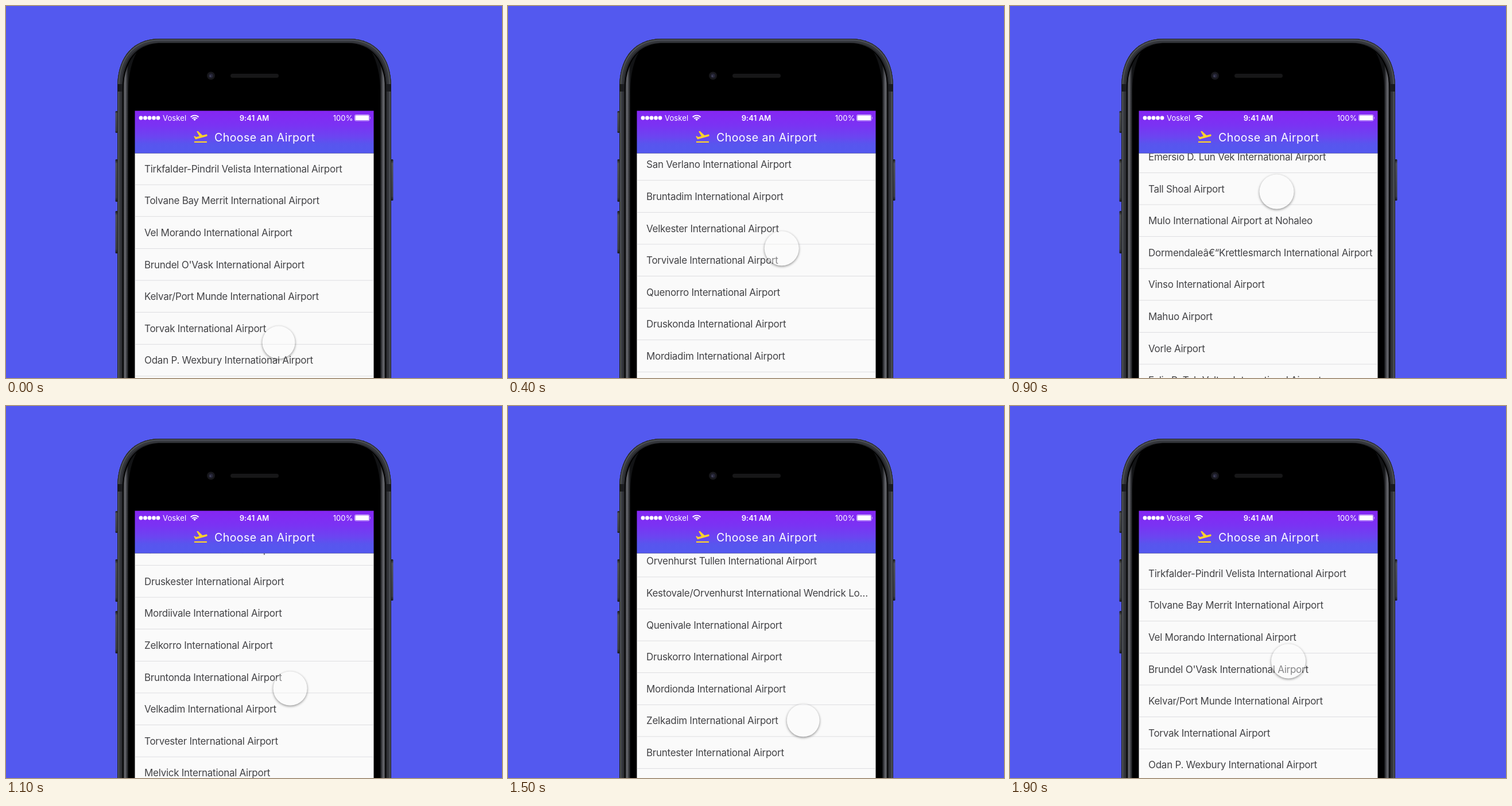
Recreate the animation shown at these times as an HTML page. Size 864 by 648 pixels, loop 2000 ms.

```html
<!DOCTYPE html>
<html lang="en">
<head>
<meta charset="utf-8">
<title>Airport list</title>
<style>
  html, body { margin: 0; width: 100%; height: 100%; overflow: hidden; background: #5359ef; }
  #stage { position: relative; width: 864px; height: 648px; overflow: hidden; }
  svg { display: block; font-family: Inter, Roboto, sans-serif; }
  #list text { font-size: 17px; letter-spacing: -.27px; fill: #434346; }
  .status { font-size: 13px; letter-spacing: .1px; fill: #fff; }
  #touch {
    position: absolute; left: 0; top: 0; border-radius: 50%;
    background: rgba(252, 252, 252, .36);
    box-shadow: 0 1.5px 4px rgba(0, 0, 0, .45);
  }
</style>
</head>
<body>
<div id="stage">
<svg width="864" height="648" viewBox="0 0 864 648">
  <defs>
    <linearGradient id="rim" gradientUnits="userSpaceOnUse" x1="204" x2="213" y1="0" y2="0">
      <stop offset="0" stop-color="#1b1c1f"/><stop offset=".35" stop-color="#6c6d73"/>
      <stop offset=".6" stop-color="#4a4b50"/><stop offset="1" stop-color="#121315"/>
    </linearGradient>
    <linearGradient id="key" x2="0" y2="1">
      <stop offset="0" stop-color="#17181b"/><stop offset=".1" stop-color="#4c4e53"/>
      <stop offset=".9" stop-color="#3a3c41"/><stop offset="1" stop-color="#17181b"/>
    </linearGradient>
    <linearGradient id="bar" x2="0" y2="1">
      <stop offset="0" stop-color="#8526f3"/><stop offset=".35" stop-color="#7a33f3"/>
      <stop offset=".62" stop-color="#6b45f1"/><stop offset=".78" stop-color="#5855ee"/>
      <stop offset="1" stop-color="#5359ef"/>
    </linearGradient>
    <path id="outline" d="M194 700V142C194 88 222 57 268 57H597C643 57 671 88 671 142V700Z"/>
    <path id="crescent" d="M204.500 648V145Q205 103 228 80Q214 106 213 145V648Z" fill="url(#rim)"/>
    <clipPath id="body"><use href="#outline"/></clipPath>
    <clipPath id="window"><rect x="224.500" y="256.500" width="416" height="392"/></clipPath>
  </defs>

  <rect width="864" height="648" fill="#5359ef"/>
  <g fill="url(#key)">
    <rect x="190.500" y="183" width="4" height="38" rx="1.500"/>
    <rect x="190.500" y="267" width="4" height="74" rx="1.500"/>
    <rect x="190.500" y="357" width="4" height="74" rx="1.500"/>
    <rect x="670.500" y="267" width="4" height="72" rx="1.500"/>
  </g>
  <g clip-path="url(#body)" fill="none">
    <use href="#outline" fill="#000"/>
    <use href="#outline" stroke="#25262a" stroke-width="19"/>
    <use href="#outline" stroke="#34363b" stroke-width="14"/>
    <use href="#outline" stroke="#4b4e54" stroke-width="7"/>
    <use href="#outline" stroke="#1f2023" stroke-width="2"/>
    <path d="M194 136h10v13h-10zM661 136h10v13h-10z" fill="#1b1c20"/>
  </g>
  <path d="M203 648V145C203 92 230 64.500 270 64.500H595C635 64.500 662 92 662 145V648Z"/>
  <use href="#crescent"/>
  <use href="#crescent" transform="translate(865) scale(-1 1)"/>
  <circle cx="357" cy="121.500" r="7" fill="#17171b"/>
  <circle cx="357" cy="121.500" r="3.800" fill="#262638"/>
  <circle cx="356" cy="122" r="1.500" fill="#46465e"/>
  <rect x="391" y="118" width="84" height="7" rx="3.500" fill="#171718"/>

  <rect x="224.500" y="256.500" width="416" height="392" fill="#fafafa"/>
  <g clip-path="url(#window)"><g id="list"></g></g>

  <rect x="224.500" y="182.500" width="416" height="74" fill="url(#bar)"/>
  <path d="M235 195h30.100" stroke="#fff" stroke-width="6.800" stroke-linecap="round" stroke-dasharray="0 7.500"/>
  <text class="status" x="273" y="199.700">Voskel</text>
  <g fill="none" stroke="#fff" stroke-width="1.900">
    <path d="M321.700 193.500a9.800 9.800 0 0 1 13.800 0M324.200 196.200a6.200 6.200 0 0 1 8.800 0"/>
    <path d="M328.600 200l-2.400-2.500a3.300 3.300 0 0 1 4.800 0z" fill="#fff" stroke="none"/>
  </g>
  <text class="status" x="432.500" y="199.700" text-anchor="middle" font-weight="600">9:41 AM</text>
  <text class="status" x="604.500" y="199.700" text-anchor="end">100%</text>
  <rect x="607.500" y="189.500" width="25.500" height="10.600" rx="2" fill="none" stroke="#fff" stroke-width=".6"/>
  <rect x="608.500" y="190.500" width="23.500" height="8.600" rx="1.200" fill="#fff"/>
  <path d="M634 193v4q1.500-2 0-4" fill="#fff"/>
  <path transform="translate(325 213.700) scale(1.160)" fill="#fcd22c"
    d="M2.500 19h19v2h-19zM22.070 9.640c-.210-.800-1.040-1.280-1.840-1.060L14.920 10 8.020 3.570l-1.930.510 4.140 7.170-4.970 1.330-1.970-1.540-1.450.390 2.590 4.490L21 11.490c.810-.230 1.280-1.050 1.070-1.850z"/>
  <text x="363" y="236" font-size="19.500" letter-spacing=".45" fill="#fff">Choose an Airport</text>
</svg>
<div id="touch"></div>
</div>

<script>
const ROW = 55.6, ROW_COUNT = 76, LOOP = 2000, STEP = 100;

// Runs of names by first row; "*" stands for "International Airport".
const runs = {
  0: ["Tirkfalder-Pindril Velista *", "Tolvane Bay Merrit *", "Vel Morando *",
    "Brundel O'Vask *", "Kelvar/Port Munde *", "Torvak *", "Odan P. Wexbury *"],
  9: ["McTolven *", "Harlen Voss Intercontinental Airport", "Pelvano *", "Durwin Harmony *",
    "Corvendalisâ€”St. Oden *", "Zuvea *", "Kolvane Metropolitan Brisk County Airport",
    "Gen. Osmund Thackeron Velds *", "Dravineâ€”Lomeca *", "Quendoravila *",
    "DeMorvena Airport", "Velko *", "Orvenhurst Tullen *",
    "Kestovale/Orvenhurst International Wendrick Lo…"],
  34: ["Dunmerrow-Valkins *", "Kendrin T. Mobry Airport", "Hobran U. Melano San MomÃ© *",
    "Calmorenda *", "Teod BuÃ±ez DorÃn *", "Dorlin-Kelfstrid *", "San Verlano *"],
  58: ["Melvick *", "Tarvound *", "Brovane *", "El Duvo *", "Emersio D. Lun Vek *",
    "Tall Shoal Airport", "Mulo * at Nohaleo", "Dormendaleâ€“Krettlesmarch *",
    "Vinso *", "Mahuo Airport", "Vorle Airport", "Felix R. Tub Velton *"]
};
const stems = ["Velk", "Torv", "Quen", "Drusk", "Mordi", "Zelk", "Brunt"];
const endings = ["onda", "adim", "ester", "ivale", "orro"];
const names = Array.from({ length: ROW_COUNT }, (_, i) => stems[i % 7] + endings[i % 5] + " *");
for (const [first, run] of Object.entries(runs)) names.splice(+first, run.length, ...run);

// Wrongly decoded dashes end in a curly quote.
const label = name => name.replace("*", "International Airport").replace("—", "”").replace("–", "“");

const list = document.getElementById("list");
const touch = document.getElementById("touch");

function add(tag, attributes, text = "") {
  const node = document.createElementNS("http://www.w3.org/2000/svg", tag);
  for (const key in attributes) node.setAttribute(key, attributes[key]);
  node.textContent = text;
  list.append(node);
}
names.forEach((name, i) => {
  add("text", { x: 241, y: 289.8 + i * ROW }, label(name));
  add("rect", { x: 224.5, y: 310.9 + i * ROW, width: 416, height: .6, fill: "#cbcbd0" });
});

// Smooth curve through [time, value] points that never overshoots them.
function curve(points) {
  const rate = points.slice(1).map(([t, v], i) => (v - points[i][1]) / (t - points[i][0]));
  const slope = points.map((_, i) => {
    const a = rate[i - 1] || 0, b = rate[i] || 0;
    return a * b > 0 ? 2 * a * b / (a + b) : 0;
  });
  return t => {
    let i = 0;
    while (i < points.length - 2 && t >= points[i + 1][0]) i++;
    const [t0, v0] = points[i], [t1, v1] = points[i + 1];
    const d = t1 - t0, u = (t - t0) / d, w = 1 - u;
    return v0 * w * w * (1 + 2 * u) + v1 * u * u * (3 - 2 * u)
      + d * u * w * (slope[i] * w - slope[i + 1] * u);
  };
}

const scroll = curve([[0, 0], [200, 860], [600, 3239], [900, 3468], [1300, 1904], [1700, 524], [1900, -8], [2000, 0]]);
const touchX = curve([[0, 475], [200, 489], [600, 464.5], [900, 464.5], [1300, 525], [1700, 497], [1900, 485], [2000, 475]]);
const touchY = curve([[0, 586], [200, 549], [600, 323.5], [900, 323.5], [1300, 660], [1700, 435.5], [1900, 444.5], [2000, 586]]);
const touchSize = curve([[0, 57], [200, 60], [900, 60], [1300, 57], [1700, 57], [1900, 60], [2000, 57]]);

function draw(now) {
  const t = Math.floor(now % LOOP / STEP) * STEP;
  const size = touchSize(t);
  list.setAttribute("transform", `translate(0 ${-scroll(t)})`);
  touch.style.width = touch.style.height = size + "px";
  touch.style.transform = `translate(${touchX(t) - size / 2}px, ${touchY(t) - size / 2}px)`;
}

let start;
function frame(now) {
  start ??= now;
  draw(now - start);
  requestAnimationFrame(frame);
}
draw(0);
requestAnimationFrame(frame);
</script>
</body>
</html>
```
